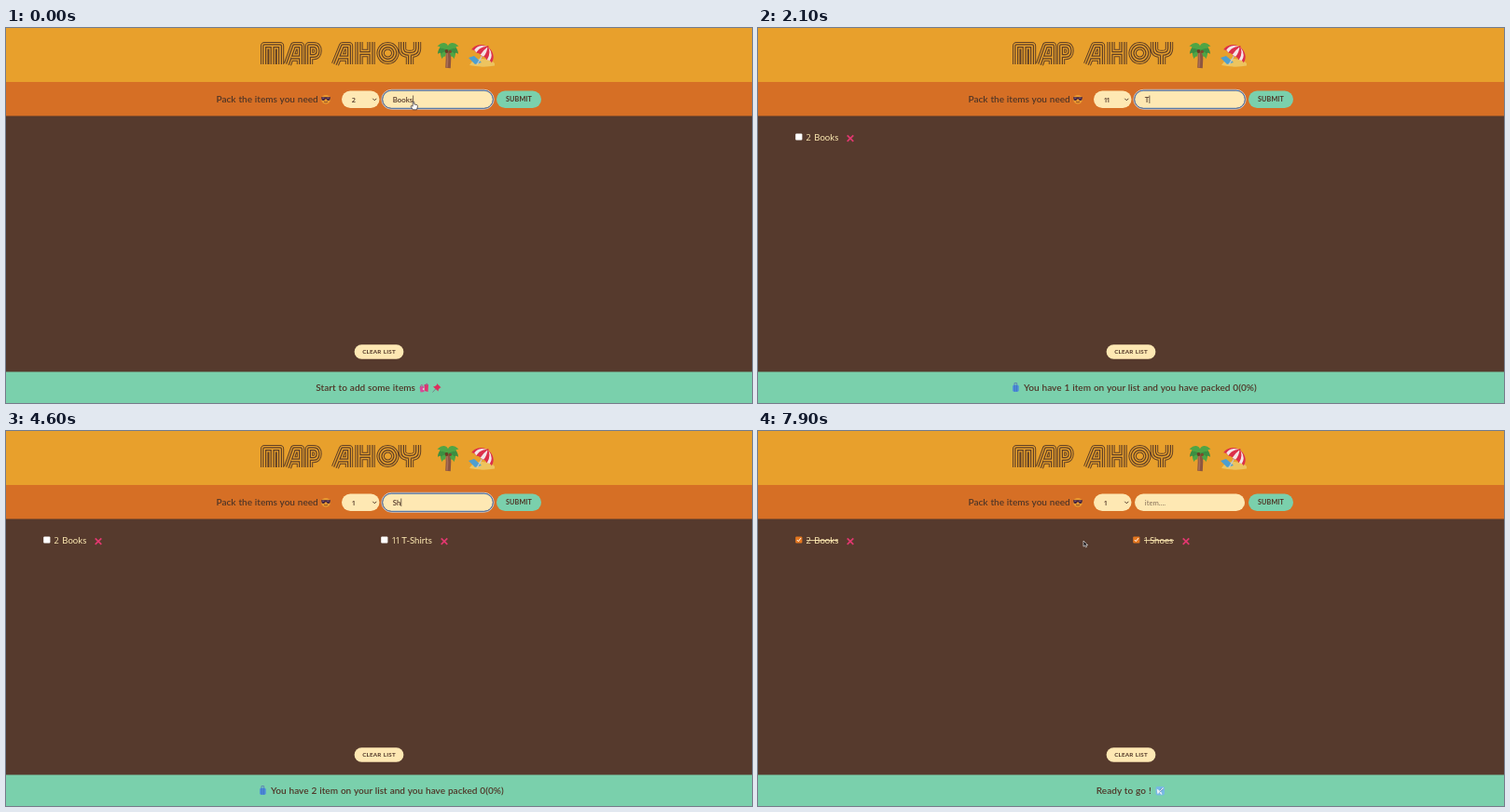
These frames come from a looping animation (800x403 px, 8 s). An HTML page:

```html
<!DOCTYPE html>
<html lang="en">
<head>
<meta charset="utf-8">
<title>Packing list</title>
<style>
  html, body { margin: 0; width: 100%; height: 100%; overflow: hidden; background: #563a2d; }
  svg { display: block; width: 100vw; height: 100vh; }
  text { font-family: Lato, "Open Sans", sans-serif; fill: #4f3527; white-space: pre; }
  .label { font-size: 10px; font-weight: 600; word-spacing: .4px; }
  .foot { font-size: 10.05px; font-weight: 600; word-spacing: .4px; }
  .field { font-size: 7.8px; font-weight: 600; }
  .hint { font-size: 7.7px; fill: #85705a; }
  .item { font-size: 9.6px; fill: #ffebb3; }
  .count { font-family: "Open Sans", "Noto Sans", sans-serif; letter-spacing: -1.3px; }
  .item.count { font-size: 9.2px; }
  .field.count { font-size: 7.3px; }
  .button { font-weight: 700; text-anchor: middle; letter-spacing: .15px; word-spacing: .8px; }
  .option { font: bold 7.3px "Liberation Sans", Arial, sans-serif; }
  .pill { fill: #fee8b3; }
  .line { fill: none; }
</style>
</head>
<body>
<svg viewBox="0 0 800 403" preserveAspectRatio="none">
  <defs>
    <filter id="soft" x="-60%" y="-10%" width="220%" height="125%"><feGaussianBlur stdDeviation="5"/></filter>
    <path id="title" d="M277.2 39V19.2H294V39M285.6 19.2V39
      M302 39L309 19.2H316V39M306 31.5H316
      M325 39V19.2H330Q334.5 19.2 334.5 24.6T330 30H325
      M353 39L361 19.2H368V39M357 31.5H368
      M378.5 15V39M391.5 15V39M378.5 27H391.5
      M409.5 19.2a7.8 7.8 0 1 1-.1 0z
      M425 15V22Q425 28 433 28T441 22V15M433 28V39"/>
    <path id="leaf" d="M0 1C1-6 10-7 12 4C10 3 9 2.500 7.500 4C6 2 3 2 0 1z"/>

    <g id="case">
      <path class="line" d="M2.700 2.500V0h2.600v2.500" stroke="#5a78b4" stroke-width=".8"/>
      <rect x=".8" y="2" width="6.600" height="7.600" rx="1.800" fill="#4f8fdb"/>
      <path d="M3 2.500v6.600M5.200 2.500v6.600" stroke="#3b69b8" stroke-width=".7"/>
    </g>
    <g id="plane">
      <rect width="9.5" height="9.5" rx="2" fill="#77b9e3"/>
      <path d="M1.2 2.4L4.2 4.4L6.8 1.4L8.3 1.2L8 2.8L5.5 5.3L7 8.5L6 8.7L4 6.4L2.2 8.2L1.6 6.6z" fill="#e8f0f6"/>
      <path d="M4.2 4.4L6.8 1.4M4 6.4L8 2.8" stroke="#4773b5" stroke-width=".7"/>
    </g>
    <g id="bags">
      <path d="M0 4L4 2.5L5 9L1 9.5z" fill="#d44a9a"/>
      <path d="M5 1L9.5 1.5L9 9L5.5 8z" fill="#e0336f"/>
      <path class="line" d="M1 4Q1.5 0 3.5 2.5M6 2Q8 -1.5 9 2" stroke="#b03a86" stroke-width=".8"/>
      <circle cx="4.2" cy="6" r="1" fill="#f4bcd2"/>
    </g>
    <g id="pin">
      <path d="M4.5 5L.5 9.5" stroke="#77848a"/>
      <path d="M5 0L9.5 4.2L8 5L6.8 6.5L6.5 8.5L1 3.5L3 3L5 1.5z" fill="#dc2f5d"/>
    </g>

    <path id="arrow" d="M0 0V6.2L1.5 4.9L2.5 7L3.6 6.5L2.7 4.5H4.6z" fill="#171519" stroke="#fff" stroke-width=".6"/>
    <path id="hand" d="M-.8 .6Q0-.5 .8 .6V3L3.8 3.6Q4.6 4 4.3 6L3.5 8.8H-.7L-3 5.2Q-2.5 4-.8 5.2z" fill="#fff" stroke="#2b2528" stroke-width=".7"/>
  </defs>

  <rect width="800" height="403" fill="#563a2d"/>
  <rect width="800" height="58" fill="#e8a02c"/>
  <rect y="58" width="800" height="36.5" fill="#d66f25"/>
  <rect y="369.5" width="800" height="34" fill="#7ad0ac"/>

  <g id="heading" class="line" stroke-linejoin="round" role="img" aria-label="MAP AHOY"></g>

  <g id="palm">
    <path class="line" d="M474 43Q475 33 474 23" stroke="#8d5540" stroke-width="5.600"/>
    <path class="line" d="M473 42.500Q474 33 473 26" stroke="#ab7056" stroke-width="1.600"/>
    <g id="leaves"></g>
    <circle cx="472.500" cy="25" r="1.900" fill="#6b3d24"/><circle cx="476.300" cy="25.400" r="1.700" fill="#7d492b"/>
  </g>
  <g id="beach">
    <path d="M497 40Q501 32 511 33T524 38V40.500Q511 43 497 40z" fill="#edc45f"/>
    <path d="M496 32L502 30L510 37L503 39z" fill="#4d9fd0"/>
    <path d="M511 29L505 39.500" stroke="#c5c9cc" stroke-width="1.300"/>
    <g transform="translate(510.500 29.500) rotate(33)">
      <path d="M-13 1A13 12 0 0 1 13 1Q10-1 6.500 1Q3-1 0 1Q-3-1-6.500 1Q-10-1-13 1z" fill="#dc2f4a"/>
      <path d="M-1-11Q-7-7-7 1Q-9-1-10 0Q-11-8-1-11zM0-11Q-2-5-2 .300L2 .200Q3-5 0-11zM1-11Q10-8 10 0L7 1Q7-7 1-11z" fill="#f3e6e6"/>
      <circle cy="-11.300" r="1" fill="#dc2f4a"/>
    </g>
  </g>

  <text class="label" x="225.500" y="80.300">Pack the items you need</text>
  <g transform="translate(343 76.800)">
    <circle r="4.900" fill="#e99a31"/>
    <path d="M-5-2.600H5L4.300 .800Q2 2.200 .500-.600H-.500Q-2 2.200-4.300 .800z" fill="#42233f"/>
    <path d="M-3.700-1.500h2M1.300-1.500h2" stroke="#8d6a9b" stroke-width=".8"/>
    <path class="line" d="M-2 2.400Q0 3.900 2 2.400" stroke="#7a3a20" stroke-width=".8"/>
  </g>

  <rect class="pill" x="360" y="67.500" width="40.500" height="18.500" rx="9.250"/>
  <path class="line" d="M393.300 75.800l2 2l2-2" stroke="#4f3527" stroke-width="1"/>
  <rect class="pill" x="404" y="67.500" width="118" height="18.500" rx="9.250"/>
  <rect x="526" y="67.500" width="48" height="18.500" rx="9.250" fill="#7ad0ac"/>
  <text class="button" x="550" y="79.400" font-size="7.200">SUBMIT</text>
  <rect class="pill" x="373.600" y="340.200" width="52.800" height="15.600" rx="7.800"/>
  <text class="button" x="400" y="350.200" font-size="6.300">CLEAR LIST</text>

  <g id="live"></g>
  <g id="pointer"></g>
</svg>

<script>
const LOOP = 8000, TICK = 100;
const $ = id => document.getElementById(id);
const use = (id, x, y) => `<use href="#${id}" x="${x}" y="${y}"/>`;
const text = (cls, x, y, str) => `<text class="${cls}" x="${x}" y="${y}">${str}</text>`;

$('heading').innerHTML = [[8.4, '#5f3f26'], [6.4, '#e8a02c'], [4, '#5f3f26'], [1.6, '#e8a02c']]
  .map(([w, color]) => `<use href="#title" stroke="${color}" stroke-width="${w}"/>`).join('');

// Fronds come in mirrored pairs
$('leaves').innerHTML = [40, 5, -35].flatMap((angle, i) => [-1, 1].map(side =>
  `<use href="#leaf" transform="translate(474 23) scale(${side} 1) rotate(${angle}) scale(.95)" fill="${(i + side) % 2 ? '#4fa545' : '#3b8f42'}"/>`
)).join('');

// name: quantity, offset of the name, offset of the delete cross
const goods = { 'Books': [2, 8.3, 47], 'T-Shirts': [11, 10.3, 56], 'Shoes': [1, 6, 45] };

const sent = list => ({ qty: 1, text: '', focus: false, list });
const typed = (start, word, gaps) => gaps.map((gap, i) => [start + gap, { text: word.slice(0, i + 1) }]);

// A trailing "*" marks a packed item
const steps = [
  [0, { qty: 2, text: 'Books', focus: true, menu: false, list: [] }],
  [500, sent(['Books'])],
  [900, { menu: true }],
  [1400, { menu: false, qty: 11 }],
  [1800, { focus: true }],
  ...typed(2100, 'T-Shirts', [0, 200, 400, 500, 600, 700, 800, 900]),
  [3800, sent(['Books', 'T-Shirts'])],
  [4200, { focus: true }],
  ...typed(4500, 'Shoes', [0, 100, 200, 300, 400]),
  [5500, sent(['Books', 'T-Shirts', 'Shoes'])],
  [6300, { list: ['Books', 'T-Shirts*', 'Shoes'] }],
  [6700, { list: ['Books*', 'T-Shirts*', 'Shoes'] }],
  [7200, { list: ['Books*', 'T-Shirts*', 'Shoes*'] }],
  [7800, { list: ['Books*', 'Shoes*'] }]
];

// Each run is one visible stretch of the pointer: time, x, y
const runs = [
  [[0, 437, 79], [100, 437, 79], [400, 548, 77], [500, 548, 77], [800, 378, 77],
   [900, 378, 78], [1100, 367, 228], [1400, 367, 228], [1700, 455, 77], [2000, 455, 77]],
  [[3300, 455, 77], [3600, 548, 77], [3800, 548, 77], [4100, 450, 77], [4400, 450, 77]],
  [[5200, 450, 77], [5400, 548, 77], [5600, 548, 77], [6200, 284, 117], [6300, 284, 117],
   [6600, 43, 121], [6700, 43, 121], [7100, 526, 118], [7200, 526, 118], [7600, 349, 118], [8000, 349, 118]]
];

function pointerAt(t) {
  const run = runs.find(r => t >= r[0][0] && t < r[r.length - 1][0]);
  if (!run) return null;
  const i = run.findIndex(p => p[0] > t);
  const [t0, x0, y0] = run[i - 1], [t1, x1, y1] = run[i];
  const k = (t - t0) / (t1 - t0), e = k * k * (3 - 2 * k);
  return { x: x0 + (x1 - x0) * e, y: y0 + (y1 - y0) * e };
}

function drawItem(entry, i, list) {
  const done = entry.endsWith('*'), name = entry.replace('*', '');
  const [qty, nameX, crossX] = goods[name];
  const x = 40.2 + i * (list.length > 2 ? 241.3 : 362), tx = x + 11.8;
  const box = `<rect x="${x}" y="113.4" width="7.2" height="7.2" rx="1" fill="${done ? '#e5771f' : '#fff'}"/>`;
  const marks = done
    ? `<path class="line" d="M${x + 1.6} 117l1.5 1.6l2.7-3.5" stroke="#fff"/>
       <path d="M${tx} 117.6h${crossX - 13}" stroke="#ffebb3" stroke-width=".9"/>` : '';
  return box + text('item count', tx - .4, 120.5, qty) + text('item', tx + nameX, 120.5, name) + marks +
    `<path d="M${tx + crossX - 3.3} 115.3l6.6 6.6m0-6.6l-6.6 6.6" stroke="#e0386f" stroke-width="1.7"/>`;
}

function drawFooter(list) {
  const total = list.length, packed = list.filter(n => n.endsWith('*')).length;
  if (!total) return text('foot', 332.3, 390.2, 'Start to add some items') + use('bags', 443.5, 382) + use('pin', 457, 382);
  if (packed === total) return text('foot', 362.8, 390.2, 'Ready to go !') + use('plane', 426.5, 382);
  const x = 286 - total;
  return use('case', x - 12.7, 381.5) + text('foot', x, 390.2,
    `You have ${total} item on your list and you have packed ${packed}(${Math.round(packed / total * 100)}%)`);
}

function drawMenu(y) {
  const hover = Math.floor((y - 87.2) / 13.6);
  let out = `<rect x="362" y="95" width="37" height="276" rx="4" fill="#21151a" opacity=".45" filter="url(#soft)"/>
    <rect class="pill" x="360.500" y="85.500" width="38.500" height="276.500" rx="4"/>`;
  if (hover >= 0) out += `<rect x="362" y="${87.3 + hover * 13.6}" width="35" height="13.6" rx="2" fill="#d8c79b"/>`;
  for (let i = 0; i < 20; i++) out += text('option', 365.8, (96.6 + i * 13.6).toFixed(1), i + 1);
  return out;
}

const ring = (grow, color, width) => `<rect class="line" x="${404 - grow}" y="${67.5 - grow}"
  width="${118 + 2 * grow}" height="${18.5 + 2 * grow}" rx="${9.25 + grow}" stroke="${color}" stroke-width="${width}"/>`;

function render(t) {
  const state = Object.assign({}, ...steps.filter(s => s[0] <= t).map(s => s[1]));
  const p = pointerAt(t);
  let out = text('field count', 370.7, 79.7, state.qty);
  if (state.focus) out += ring(1.2, '#c9d6e6', .9) + ring(.3, '#3d76ba', 1);
  out += state.text ? `<text id="entry" class="field" x="414.800" y="79.700">${state.text}</text>`
                    : text('hint', 414.8, 79.7, 'item....');
  out += state.list.map(drawItem).join('') + drawFooter(state.list);
  if (state.menu) out += drawMenu(p.y);
  $('live').innerHTML = out;

  if (state.focus) {
    const x = 415.2 + (state.text ? $('entry').getComputedTextLength() : 0);
    $('live').insertAdjacentHTML('beforeend', `<path d="M${x} 72.500v8.500" stroke="#3a2a22" stroke-width=".7"/>`);
  }
  $('pointer').innerHTML = p ? use(p.y < 100 || state.menu ? 'hand' : 'arrow', p.x, p.y) : '';
}

let last = -1;
const start = performance.now();
function loop(now) {
  const t = Math.floor(Math.max(0, now - start) % LOOP / TICK) * TICK;
  if (t !== last) render(last = t);
  requestAnimationFrame(loop);
}
render(0);
requestAnimationFrame(loop);
</script>
</body>
</html>
```
